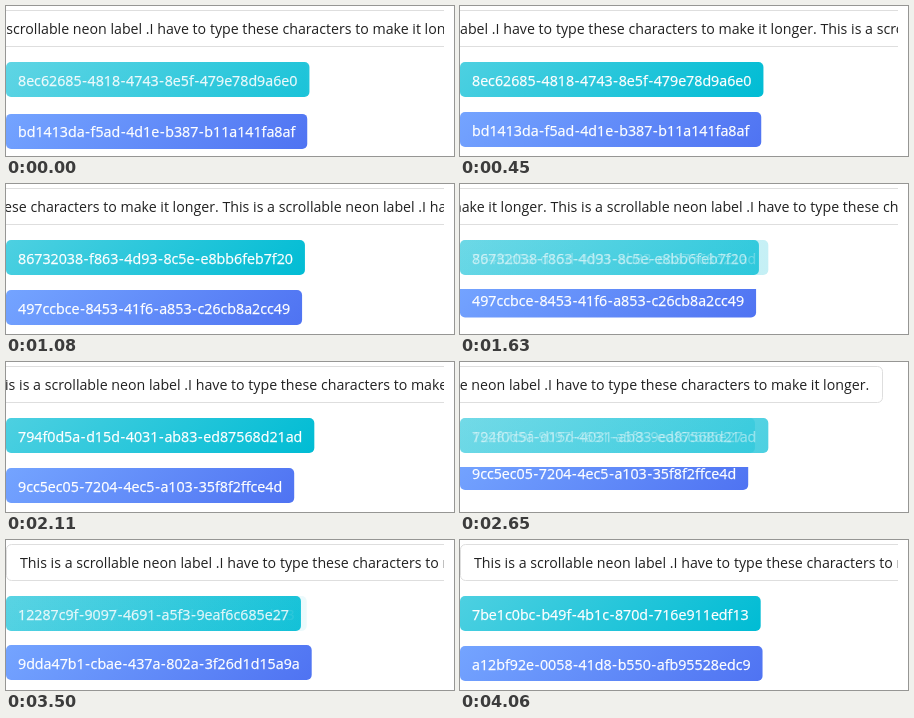
An HTML page with a canvas for the animation above (4360 ms loop, 448x150 px).

```html
<!DOCTYPE html>
<html lang="en">
<head>
<meta charset="utf-8">
<title>Scrolling label and tag transitions</title>
<style>
  html, body { margin: 0; height: 100%; overflow: hidden; background: #fff; }
  canvas { display: block; }
</style>
</head>
<body>
<canvas id="stage" width="448" height="150"></canvas>
<script>
const ctx = document.getElementById('stage').getContext('2d');
const LOOP = 4360;
const FAMILY = '"Open Sans", "Noto Sans", sans-serif';

// The picture advances in discrete ticks: [first, last, count] in ms.
const ticks = [
  [0, 0, 1], [70, 520, 7], [600, 1080, 7], [1160, 1630, 7], [1710, 2190, 7],
  [2270, 2650, 6], [2740, 2740, 1], [2800, 3050, 4], [3500, 3980, 7], [4060, 4060, 1]
].flatMap(([first, last, count]) => Array.from({ length: count }, (_, i) =>
  Math.round((first + (last - first) * i / Math.max(1, count - 1)) / 10) * 10));

const SENTENCE = 'This is a scrollable neon label .I have to type these characters to make it longer.';
const LABEL = {
  font: '14.2px ' + FAMILY,
  width: 1073, viewport: 438, start: 70, step: 18, end: 650, resetAt: 3500
};

const SWAP = { starts: [-531, 482, 1492, 2470, 3452], duration: 600, distance: 72 };
const CYAN = {
  y: 56, colors: ['#4dd0e1', '#00bcd4'],
  texts: [
    '7be1c0bc-b49f-4b1c-870d-716e911edf13',
    '8ec62685-4818-4743-8e5f-479e78d9a6e0',
    '86732038-f863-4d93-8c5e-e8bb6feb7f20',
    '794f0d5a-d15d-4031-ab83-ed87568d21ad',
    '12287c9f-9097-4691-a5f3-9eaf6c685e27',
    '7be1c0bc-b49f-4b1c-870d-716e911edf13'
  ]
};
const BLUE = {
  y: 106, colors: ['#74a4ff', '#4f73f2'],
  texts: [
    'a12bf92e-0058-41d8-b550-afb95528edc9',
    'bd1413da-f5ad-4d1e-b387-b11a141fa8af',
    '497ccbce-8453-41f6-a853-c26cb8a2cc49',
    '9cc5ec05-7204-4ec5-a103-35f8f2ffce4d',
    '9dda47b1-cbae-437a-802a-3f26d1d15a9a',
    'a12bf92e-0058-41d8-b550-afb95528edc9'
  ]
};
const TAG = {
  font: '14.24px ' + FAMILY,
  height: 35, padding: 12, radius: 5, baseline: 23.5, hyphenPad: 0.7
};

const easeInOut = u => u < 0.5 ? 2 * u * u : 1 - 2 * (1 - u) ** 2;

function roundedRect(x, y, width, height, radius) {
  ctx.beginPath();
  ctx.roundRect(x, y, width, height, radius);
}

function clipped(x, y, width, height, draw) {
  ctx.save();
  ctx.beginPath();
  ctx.rect(x, y, width, height);
  ctx.clip();
  draw();
  ctx.restore();
}

function drawLabel(time, index) {
  const scroll = time >= LABEL.resetAt ? 0
    : Math.min(LABEL.end, LABEL.start + LABEL.step * index);
  ctx.font = LABEL.font;
  clipped(0, 0, LABEL.viewport, 50, () => {
    ctx.strokeStyle = '#dedede';
    ctx.lineWidth = 1;
    roundedRect(0.5 - scroll, 4.5, LABEL.width - 1, 36, 5);
    ctx.stroke();
    ctx.fillStyle = '#212121';
    ctx.fillText(SENTENCE + ' ' + SENTENCE, 14 - scroll, 28);
  });
}

// Splits an identifier into placed pieces, with a little air around hyphens.
function layout(text) {
  let x = TAG.padding;
  const pieces = text.split(/(-)/).map(piece => {
    const pad = piece === '-' ? TAG.hyphenPad : 0;
    const placed = { piece, x: x + pad };
    x += ctx.measureText(piece).width + 2 * pad;
    return placed;
  });
  return { pieces, width: x + TAG.padding };
}

function drawTag({ colors, y }, text, { shift = 0, alpha = 1 }) {
  ctx.font = TAG.font;
  const { pieces, width } = layout(text);
  const top = y + shift;
  const reach = (width + TAG.height) / 2;
  const gradient = ctx.createLinearGradient(0, top, reach, top + reach);
  colors.forEach((color, i) => gradient.addColorStop(i, color));
  ctx.globalAlpha = alpha;
  ctx.fillStyle = gradient;
  roundedRect(0, top, width, TAG.height, TAG.radius);
  ctx.fill();

  // A hairline outline gives the light text its slightly heavier weight.
  ctx.fillStyle = ctx.strokeStyle = '#fff';
  ctx.lineWidth = 0.25;
  for (const { piece, x } of pieces) {
    ctx.fillText(piece, x, top + TAG.baseline);
    ctx.strokeText(piece, x, top + TAG.baseline);
  }
  ctx.globalAlpha = 1;
}

function drawTags(time) {
  const current = SWAP.starts.findLastIndex(start => start <= time);
  const progress = Math.min(1, (time - SWAP.starts[current]) / SWAP.duration);
  const next = current + 1;

  if (progress < 1) drawTag(CYAN, CYAN.texts[current], { alpha: 1 - progress });
  drawTag(CYAN, CYAN.texts[next], { alpha: progress });

  const travel = SWAP.distance * easeInOut(progress);
  clipped(0, 105, 448, 38, () => {
    drawTag(BLUE, BLUE.texts[current], { shift: -travel });
    drawTag(BLUE, BLUE.texts[next], { shift: SWAP.distance - travel });
  });
}

function render(elapsed) {
  const index = ticks.findLastIndex(tick => tick <= elapsed);
  const time = ticks[index];
  ctx.fillStyle = '#fff';
  ctx.fillRect(0, 0, 448, 150);
  drawLabel(time, index);
  drawTags(time);
}

const startTime = performance.now();
function frame() {
  render((performance.now() - startTime) % LOOP);
  requestAnimationFrame(frame);
}
frame();
</script>
</body>
</html>
```
